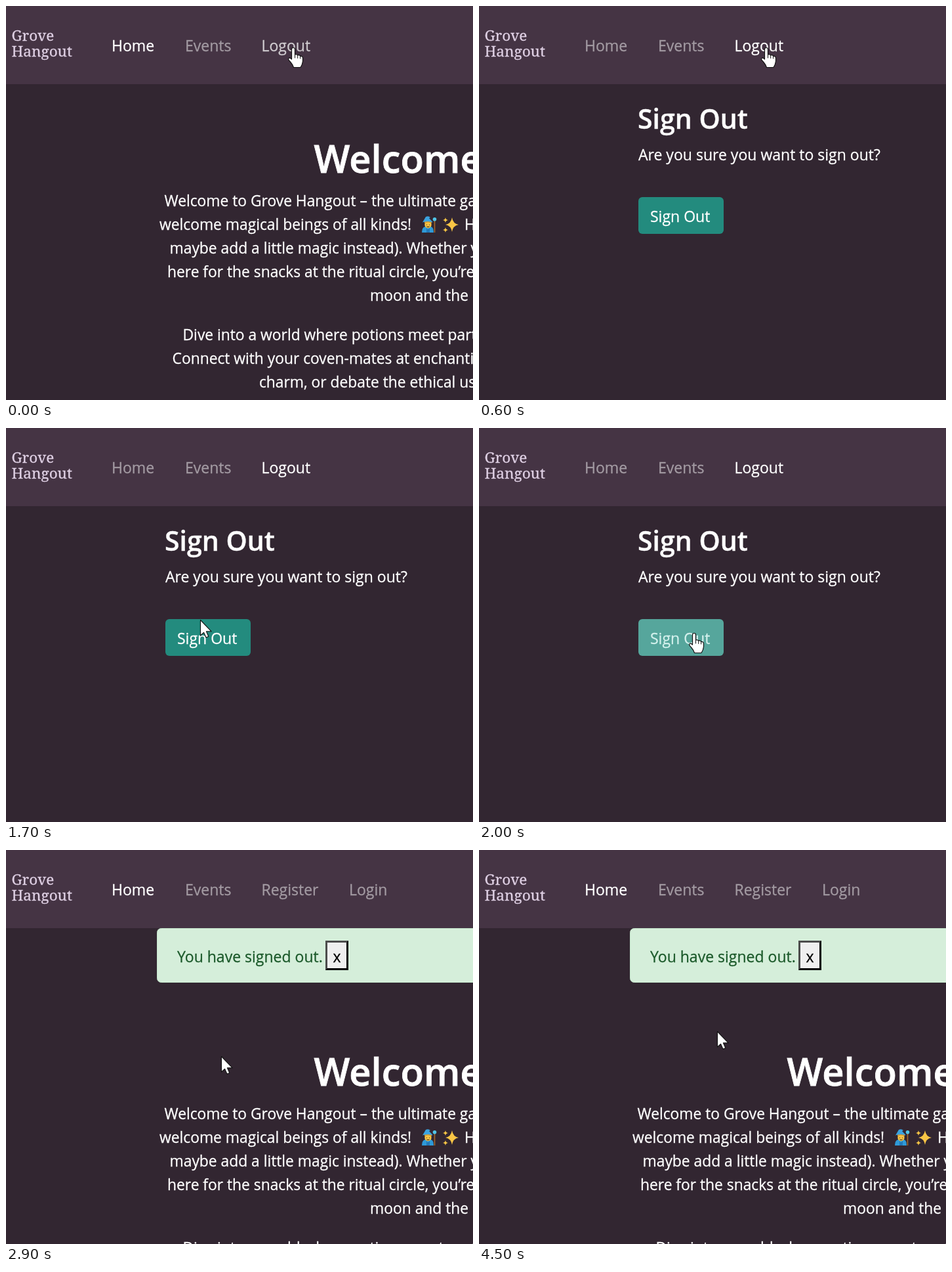
An HTML page that plays this animation: 712x600 px, repeating every 4600 ms.

```html
<!DOCTYPE html>
<html lang="en">
<head>
<meta charset="utf-8">
<title>Signing out</title>
<style>
  html, body { margin: 0; width: 100%; height: 100%; overflow: hidden; background: #322631; }
  svg { display: block; width: 712px; height: 600px; color: #fff; }
  text {
    font: 23px "Open Sans", "Noto Sans", sans-serif; white-space: pre;
    fill: currentColor; stroke: currentColor; stroke-width: .3;
  }
  .brand { color: #dfd0e4; }
  .brand text { font: 22.5px "Noto Serif", serif; }
  #copy text { font-size: 22.8px; }
  .title { font-weight: 600; font-size: 58px; stroke-width: .8; }
  .subtitle { font-weight: 600; font-size: 41px; stroke-width: .4; }
  .cursor path { fill: #fff; stroke: #111; stroke-linejoin: round; stroke-linecap: round; }
</style>
</head>
<body>
<svg viewBox="0 0 712 600">
  <rect width="712" height="600" fill="#322631"/>

  <g id="welcome">
    <text class="title" x="469.500" y="254">Welcome</text>
    <g id="copy"></g>
    <g id="mage" transform="translate(632 320)">
      <path d="M2 25Q2 17 7 16H16Q20 17 20 25Z" fill="#2f9ad8"/>
      <path d="M9 17L11 21L14 17V25H9Z" fill="#2278b8"/>
      <circle cx="11.5" cy="13" r="5.2" fill="#f6c344"/>
      <path d="M6 11Q11 8 17 11V8H6Z" fill="#d29a35"/>
      <path d="M3 9.5L8 1Q12-1 15 2L13 3L19 9.5Q11 6.5 3 9.5Z" fill="#3ba3e0"/>
      <path d="M9.5 13.3V13M13.5 13.3V13M9.8 16Q11.5 17 13.2 16" fill="none" stroke="#4b351f" stroke-width="1.1" stroke-linecap="round"/>
      <path d="M21.5 7V25" stroke="#a5682a" stroke-width="1.600"/>
      <circle cx="21.5" cy="4.8" r="2.8" fill="#50c5e8"/>
    </g>
    <g id="sparkles" transform="translate(665 320)" fill="#f8c545">
      <path d="M15 2Q16.5 11.5 25 13Q16.5 14.5 15 24Q13.5 14.5 5 13Q13.5 11.5 15 2Z"/>
      <path d="M5 2Q5.5 5.5 9 6Q5.5 6.5 5 10Q4.5 6.5 1 6Q4.5 5.5 5 2Z"/>
      <path d="M5 17Q5.5 20.5 9 21Q5.5 21.5 5 25Q4.5 21.5 1 21Q4.5 20.5 5 17Z"/>
    </g>
  </g>

  <g id="confirm">
    <text class="subtitle" x="242" y="187">Sign Out</text>
    <text x="243" y="235">Are you sure you want to sign out?</text>
    <rect id="ring" x="239" y="287" width="138" height="64" rx="9" fill="#263961"/>
    <rect id="button" x="243" y="291" width="130" height="56" rx="6"/>
    <text id="buttonLabel" x="261" y="329">Sign Out</text>
  </g>

  <g id="alert">
    <rect x="230.5" y="119.5" width="520" height="82" rx="6" fill="#d5eeda" stroke="#c6e6cc"/>
    <text x="261" y="171" color="#1c5a2b">You have signed out.</text>
    <rect x="487" y="138" width="35" height="45" fill="#000"/>
    <path d="M487 183V138H522L519 141H490V180Z" fill="#4d4d4d"/>
    <rect x="490" y="141" width="29" height="39" fill="#efefef"/>
    <text x="498.5" y="171" color="#000">x</text>
  </g>

  <rect width="712" height="119" fill="#453444"/>
  <g class="brand">
    <text x="8.5" y="53">Grove</text>
    <text x="8.5" y="77">Hangout</text>
  </g>
  <text id="home" x="161" y="69">Home</text>
  <text x="273" y="69" opacity=".5">Events</text>
  <text id="logout" x="389.500" y="69">Logout</text>
  <g id="guest" opacity=".5">
    <text x="389.500" y="69">Register</text>
    <text x="523" y="69">Login</text>
  </g>

  <g id="hand" class="cursor">
    <path stroke-width="1.2" d="M-2.5 3Q-2.5.5 0 .5Q2.5.5 2.5 3V11Q5 9.8 6.8 12Q9 11 10.7 13.3Q14.5 13 14.5 16.5V21Q14 26 11 30.5H.5Q-1 26-4.5 22Q-8.5 18-7 16.6Q-5 15-2.5 18Z"/>
    <path style="fill:none" stroke-width="1" d="M2.5 11V16M6.7 12V16.5M10.6 13.5V17"/>
  </g>
  <g id="arrow" class="cursor">
    <path stroke-width="1.1" d="M.5.5V24L5.5 19.3L9 27L12.8 25.5L9.4 17.8H17.2Z"/>
  </g>
</svg>
<script>
const LOOP = 4600, STEP = 100;
const CONFIRM_AT = 600, HOVER_AT = 1900, CLICK_AT = 2600, SIGNED_OUT_AT = 2900;

const copyLines = [
  [241.5, 305, "Welcome to Grove Hangout – the ultimate gathering"],
  [234, 341, "welcome magical beings of all kinds!"],
  [699, 341, "Here"],
  [249.5, 377, "maybe add a little magic instead). Whether you"],
  [246, 413, "here for the snacks at the ritual circle, you’re here"],
  [555, 449, "moon and the"],
  [269.5, 509, "Dive into a world where potions meet parties"],
  [253.5, 545, "Connect with your coven-mates at enchanting"],
  [386, 581, "charm, or debate the ethical use"]
];

// Pointer tip as [time, x, y]
const pointerPath = [
  [0, 438, 63], [800, 438, 63], [1100, 434, 75], [1300, 434, 75],
  [1400, 420, 112], [1500, 378, 190], [1600, 328, 258], [1700, 296, 292],
  [1800, 290, 304], [1900, 316, 311], [2000, 328, 312], [2500, 328, 312],
  [2600, 328, 314], [3000, 328, 314], [3400, 363, 276], [LOOP, 363, 276]
];

const $ = id => document.getElementById(id);
const clamp = v => Math.max(0, Math.min(1, v));
const mix = (a, b, p) => a + (b - a) * p;
const mixColor = (a, b, p) => `rgb(${a.map((v, i) => Math.round(mix(v, b[i], p)))})`;
const show = (id, on) => $(id).setAttribute("display", on ? "inline" : "none");
const move = (id, x, y) => $(id).setAttribute("transform", `translate(${x} ${y})`);

for (const [x, y, words] of copyLines) {
  const line = document.createElementNS("http://www.w3.org/2000/svg", "text");
  line.setAttribute("x", x);
  line.setAttribute("y", y);
  line.textContent = words;
  $("copy").append(line);
}

function pointerAt(t) {
  const i = pointerPath.findIndex(point => point[0] > t);
  const [t0, x0, y0] = pointerPath[i - 1], [t1, x1, y1] = pointerPath[i];
  const p = (t - t0) / (t1 - t0);
  return [mix(x0, x1, p), mix(y0, y1, p)];
}

function render(t) {
  const signedOut = t >= SIGNED_OUT_AT;
  const confirming = t >= CONFIRM_AT && !signedOut;
  show("welcome", !confirming);
  show("confirm", confirming);
  show("alert", signedOut);
  show("guest", signedOut);
  show("logout", !signedOut);
  move("welcome", 0, signedOut ? 105 : 0);
  $("home").setAttribute("opacity", confirming ? 0.5 : 1);
  $("logout").setAttribute("opacity", confirming ? 1 : 0.75);

  const hover = clamp((t - HOVER_AT - 70) / 130);
  $("button").setAttribute("fill", mixColor([35, 139, 126], [255, 255, 255], hover));
  $("buttonLabel").setAttribute("color", mixColor([255, 255, 255], [69, 193, 176], hover));
  show("ring", t >= CLICK_AT);

  const onLink = t < 1400 || (t >= HOVER_AT && t < CLICK_AT);
  show("hand", onLink);
  show("arrow", !onLink);
  const [x, y] = pointerAt(t);
  move("hand", x, y);
  move("arrow", x, y);
}

const start = performance.now();
function tick() {
  const t = (performance.now() - start) % LOOP;
  render(Math.floor(t / STEP) * STEP);
  requestAnimationFrame(tick);
}
tick();
</script>
</body>
</html>
```
